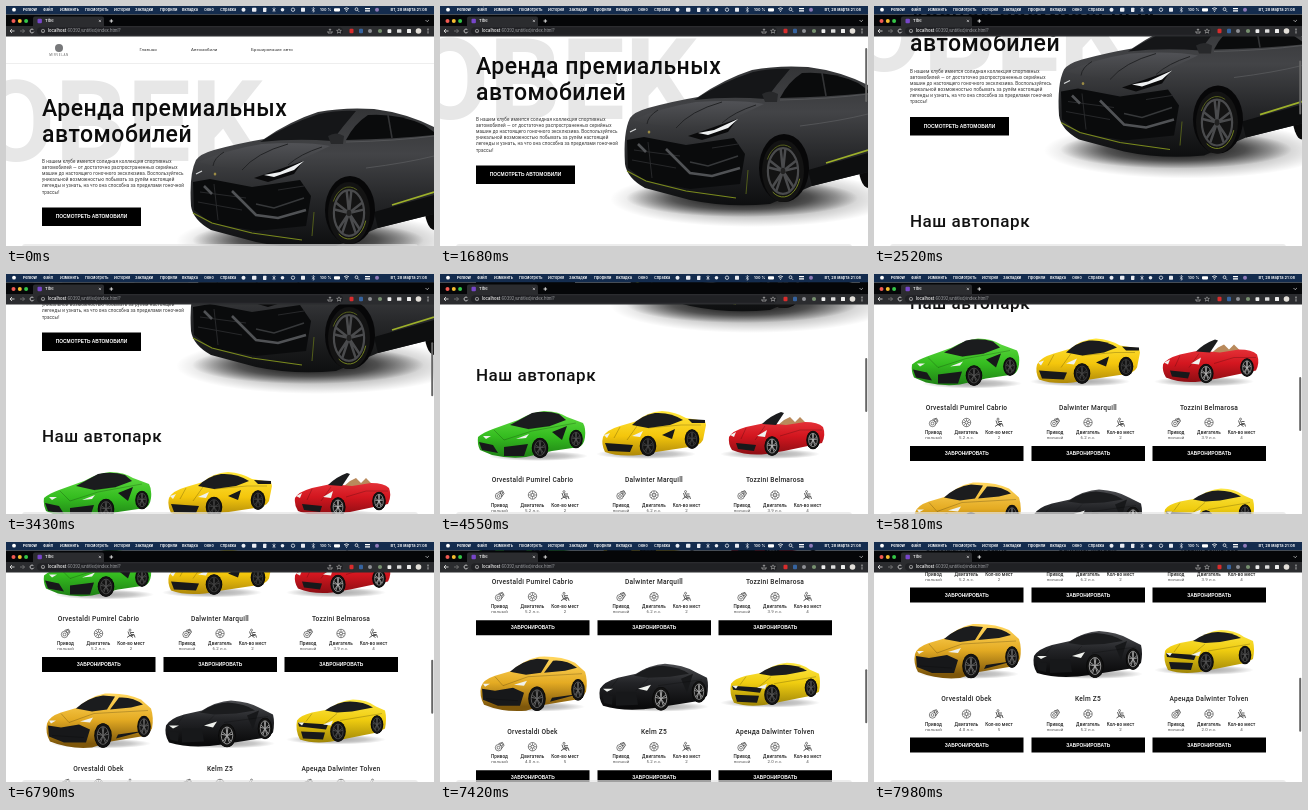
An HTML page with a canvas that plays this animation: 428 px wide and 240 px high, repeating every 8000 ms.

```html
<!DOCTYPE html>
<html lang="ru">
<head>
<meta charset="utf-8">
<title>Аренда автомобилей</title>
<style>
html, body { margin: 0; width: 100%; height: 100%; overflow: hidden; background: #fff; }
canvas { display: block; width: 100vw; height: 100vh; }
</style>
</head>
<body>
<canvas></canvas>
<script>
const W = 428, H = 240, LOOP = 8000, STEP = 70, START = 910;
const canvas = document.querySelector('canvas');
const c = canvas.getContext('2d');
const ROBOTO = 'Roboto, sans-serif', INTER = 'Inter, sans-serif', ARIAL = '"Liberation Sans", sans-serif';

// Page scroll: time in ms, offset in px
const SCROLL = [[START, 0], [1680, 42], [3430, 143], [4550, 204], [5810, 276.5], [6790, 333.5], [7980, 403]];

function scrollAt(t) {
  if (t < START + STEP) return 0;
  const q = START + Math.floor((t - START) / STEP) * STEP;
  for (let i = 1; i < SCROLL.length; i++) {
    const [t0, a] = SCROLL[i - 1], [t1, b] = SCROLL[i];
    if (q <= t1) return a + (b - a) * (q - t0) / (t1 - t0);
  }
  return SCROLL[SCROLL.length - 1][1];
}

function text(s, x, y, size, { font = ROBOTO, weight = 400, color = '#111', align = 'left', gap = 0 } = {}) {
  c.font = `${weight} ${size}px ${font}`;
  c.letterSpacing = gap + 'px';
  c.textAlign = align;
  c.textBaseline = 'alphabetic';
  c.fillStyle = color;
  c.fillText(s, x, y + size * 0.355);
}

function rect(x, y, w, h, color, r = 0) {
  c.fillStyle = color;
  c.beginPath();
  c.roundRect(x, y, w, h, r);
  c.fill();
}

function oval(x, y, rx, ry, color) {
  c.fillStyle = color;
  c.beginPath();
  c.ellipse(x, y, rx, ry, 0, 0, 7);
  c.fill();
}

function ring(x, y, rx, ry, color, width = 0.6, from = 0, to = 7) {
  c.strokeStyle = color;
  c.lineWidth = width;
  c.beginPath();
  c.ellipse(x, y, rx, ry, 0, from, to);
  c.stroke();
}

function shape(d, color) {
  c.fillStyle = color;
  c.fill(new Path2D(d));
}

function line(d, color, width = 0.7) {
  c.strokeStyle = color;
  c.lineWidth = width;
  c.stroke(new Path2D(d));
}

function fade(y0, y1, ...colors) {
  const g = c.createLinearGradient(0, y0, 0, y1);
  colors.forEach((col, i) => g.addColorStop(i / (colors.length - 1), col));
  return g;
}

function shadow(x, y, rx, ry, alpha) {
  c.save();
  c.translate(x, y);
  c.scale(rx, ry);
  const g = c.createRadialGradient(0, 0, 0, 0, 0, 1);
  g.addColorStop(0, `rgba(0,0,0,${alpha})`);
  g.addColorStop(0.6, `rgba(0,0,0,${alpha * 0.6})`);
  g.addColorStop(1, 'rgba(0,0,0,0)');
  oval(0, 0, 1, 1, g);
  c.restore();
}

function wheel(x, y, rx, ry, rim) {
  oval(x, y, rx, ry, '#131313');
  ring(x, y, rx * 0.72, ry * 0.74, rim, ry * 0.07);
  c.strokeStyle = rim;
  c.lineWidth = ry * 0.08;
  c.beginPath();
  for (let i = 0; i < 5; i++) {
    const a = i * Math.PI * 0.4 - 1.57;
    for (const da of [-0.16, 0.16]) {
      c.moveTo(x, y);
      c.lineTo(x + Math.cos(a + da) * rx * 0.7, y + Math.sin(a + da) * ry * 0.72);
    }
  }
  c.stroke();
}

function blackButton(x, y, w, h, label) {
  rect(x, y, w, h, '#000');
  text(label, x + w / 2, y + h / 2, 4.9, { font: ARIAL, weight: 700, color: '#fff', align: 'center' });
}

const CARS = [
  { name: 'Orvestaldi Pumirel Cabrio', power: '5.2', seats: 2, colors: ['#62dc42', '#35bd20', '#1c7a14'], rim: '#555',
    body: 'M38 163Q44 158 53 155L78 146Q92 138 104 137Q118 137 127 143L143 149Q146 154 145 163Q144 171 139 173L112 177L86 183Q70 185 52 181L40 176Q37 170 38 163Z',
    glass: 'M70 151L92 139Q106 136 119 140L126 146L110 152L88 155Z',
    dark: 'M39 168L53 171L58 179L42 176ZM64 173L88 170L84 182L64 182ZM112 158L127 152L122 166Z',
    lamp: 'M43 162L51 162L46 165ZM76 165L89 160L86 164Z',
    crease: 'M54 156L64 166L92 157L136 149M88 155L110 152',
    wheels: [[100, 174, 7.5, 10], [136, 165, 6, 9]] },
  { name: 'Dalwinter Marquill', power: '6.2', seats: 2, colors: ['#ffe53a', '#f4c60c', '#9e7a08'], rim: '#444',
    body: 'M163 163Q166 156 180 152L197 147Q207 138 222 137Q236 138 246 144L265 147L266 151L263 166Q260 172 249 173L216 178L199 181Q178 183 165 178Q161 170 163 163Z',
    glass: 'M192 151Q202 141 215 139Q231 138 243 146L230 151L208 154Z',
    dark: 'M165 169L193 171L190 178L168 177ZM222 161L235 155L232 165ZM248 145L265 146L265 149L252 149Z',
    lamp: 'M164 161L170 159L167 164ZM192 162L203 157L200 163Z',
    crease: 'M180 153L174 164M197 152L187 166M208 154L241 151L261 151',
    wheels: [[208, 172, 7.5, 10], [252, 165, 6.5, 9.5]] },
  { name: 'Tozzini Belmarosa', power: '3.9', seats: 4, colors: ['#f04348', '#d3161f', '#780b10'], rim: '#bbb',
    body: 'M289 163Q292 157 306 153L325 149L346 151L365 148Q378 148 383 153Q386 161 382 169L344 177L326 180Q307 182 292 176Q288 170 289 163Z',
    glass: 'M322 150Q330 142 341 138L344 139L336 151Z',
    trim: 'M338 151L344 146L350 143L355 148L360 143L366 149L350 153Z',
    dark: 'M296 169L316 171L314 177L298 175Z',
    lamp: 'M290 161L296 158L294 163ZM317 162L327 156L325 163Z',
    crease: 'M306 154L301 165M325 152L315 166M340 162L360 156L382 156',
    wheels: [[332, 172, 6.8, 9.5], [373, 166, 6, 9]] },
  { name: 'Orvestaldi Obek', power: '4.0', seats: 5, colors: ['#ffd55c', '#e4ab23', '#7e570b'], rim: '#666',
    body: 'M41 112Q43 105 55 101L72 96Q84 85 99 82Q121 81 135 88L145 97Q148 106 146 117L141 124L105 130L86 136Q64 138 44 130Q39 121 41 112Z',
    glass: 'M70 97Q82 86 97 84L109 85L101 98L86 100ZM104 98L113 86Q127 85 137 93L125 96Z',
    dark: 'M42 114L55 116L73 113L84 118L80 131L58 131L43 125ZM140 119L110 127L112 123Z',
    lamp: 'M43 109L50 109L45 112ZM74 110L87 106L84 111Z',
    crease: 'M55 102L63 111L88 102L142 99M46 124L78 126',
    wheels: [[97, 124, 8, 12], [138, 115, 6, 10.5]] },
  { name: 'Kelm Z5', power: '5.2', seats: 2, colors: ['#56575b', '#232427', '#0a0a0b'], rim: '#a8a8a8',
    body: 'M160 114Q164 107 178 103L196 99Q210 90 225 89Q243 90 255 97L267 103Q269 111 267 121L260 126L216 133Q186 138 163 131Q158 123 160 114Z',
    glass: 'M194 101Q208 91 222 91Q239 92 249 99L230 102L208 103Z',
    dark: 'M162 119L173 121L172 130L164 128ZM176 117L196 117L198 130L176 131ZM241 104L253 99L247 118Z',
    lamp: 'M163 114L173 114L167 117ZM198 114L211 110L207 116Z',
    crease: 'M178 104L170 114M208 104L196 116M218 111L262 105',
    wheels: [[221, 124, 8, 11.5], [259, 117, 6.5, 10.5]] },
  { name: 'Аренда Dalwinter Tolven', power: '2.0', seats: 4, colors: ['#ffec52', '#f0cd10', '#9b8207'], rim: '#555',
    body: 'M291 109Q294 104 306 101L322 98Q334 89 347 88Q361 88 370 95L379 99Q381 107 379 117L371 121L336 128Q311 134 294 128Q289 119 291 109Z',
    glass: 'M319 99Q332 90 344 90Q358 90 367 96L346 100L331 101Z',
    dark: 'M292 111L322 113L320 118L293 115ZM295 120L319 121L317 128L297 127Z',
    lamp: 'M292 111L298 111L296 114ZM317 113L327 109L325 114Z',
    crease: 'M306 102L300 110M331 102L319 112M334 109L376 102',
    wheels: [[332, 120, 7, 10], [371, 113, 5.5, 9]] },
];

function smallCar(car, row) {
  const top = row ? 84 : 138, [x, y] = car.wheels[0];
  shadow(x - 2, y + 8, 50, 5, 0.35);
  for (const [wx, wy, rx, ry] of car.wheels) oval(wx, wy, rx + 1, ry, '#0b0b0b');
  if (car.trim) shape(car.trim, '#b98a5c');
  shape(car.body, fade(top, top + 48, ...car.colors));
  shape(car.glass, '#1b1c1e');
  shape(car.dark, '#17181a');
  line(car.crease, 'rgba(0,0,0,.3)', 0.7);
  shape(car.lamp, '#f0f2ee');
  for (const [wx, wy, rx, ry] of car.wheels) {
    oval(wx, wy, rx + 0.8, ry + 0.2, '#080808');
    wheel(wx, wy, rx, ry, car.rim);
  }
}

function specIcon(kind, x, y) {
  const ink = '#333';
  if (kind === 0) {
    ring(x - 1, y + 1, 3.2, 3.2, ink);
    ring(x - 1, y + 1, 1.4, 1.4, ink);
    line(`M${x - 1} ${y - 3}L${x + 3} ${y - 4.3}L${x + 4.5} ${y - 1.5}L${x + 2} ${y + 2}`, ink);
    ring(x + 2, y - 2, 1.2, 1.2, ink);
  } else if (kind === 1) {
    ring(x, y, 4.2, 4.2, ink);
    ring(x, y, 1.5, 1.5, ink);
    line(`M${x - 4} ${y}h2.5m3 0h2.5M${x} ${y - 4}v2.5m0 3v2.5M${x - 3} ${y - 3}l2 2m2 2l2 2M${x + 3} ${y - 3}l-2 2m-2 2l-2 2`, ink, 0.5);
  } else {
    ring(x - 1, y - 3.4, 1, 1, ink);
    line(`M${x - 1} ${y - 2}l1 3h3l1 3M${x - 3} ${y - 2}l1.4 4h4M${x - 4} ${y + 4}l3-2 3 2M${x} ${y - 1}h3`, ink, 0.8);
  }
}

function card(car, i) {
  const row = Math.floor(i / 3), cx = [92.5, 214, 335][i % 3], dy = row * 150;
  c.save();
  c.translate(0, row ? 403 : 204);
  smallCar(car, row);
  c.restore();
  text(car.name, cx, 410 + dy, 6.6, { weight: 500, align: 'center', gap: 0.25, color: '#222' });
  const specs = [['Привод', 'полный'], ['Двигатель', car.power + ' л.с.'], ['Кол-во мест', car.seats]];
  specs.forEach(([label, value], k) => {
    const x = cx + [-33, 0, 32.5][k];
    specIcon(k, x, 425 + dy);
    text(label, x, 435 + dy, 4.6, { weight: 500, align: 'center', gap: 0.1, color: '#222' });
    text(value, x, 440 + dy, 4.4, { align: 'center', gap: 0.1, color: '#555' });
  });
  blackButton(cx - 56.5, 448.5 + dy, 113.5, 15, 'ЗАБРОНИРОВАТЬ');
}

function heroCar() {
  shadow(312, 235, 142, 28, 0.4);
  shadow(302, 234, 116, 19, 0.95);
  oval(428, 196, 10, 28, '#0a0a0a');
  shape('M185 200Q183 168 190 154Q194 148 208 144Q234 137 258 133Q284 115 312 106Q338 101 368 103Q400 107 428 121L428 208L372 222L330 240Q288 244 250 236L205 224Q187 214 185 200Z',
    fade(102, 240, '#333436', '#434447', '#252628', '#0e0f10'));
  // Windshield, hood and side glass
  shape('M254 136Q282 118 313 108Q334 104 350 105Q337 120 326 135Q290 132 254 136Z', '#151618');
  shape('M192 156Q224 143 256 138Q300 135 324 140Q302 150 282 160Q236 168 192 156Z', fade(138, 165, '#505155', '#38393b'));
  line('M218 146Q208 152 207 160M282 138Q250 147 236 164M316 141Q294 148 282 159', '#232426', 1);
  shape('M340 134Q348 118 362 109Q392 107 418 119L428 126L428 129Q390 133 340 134Z', '#0a0b0c');
  line('M382 109L386 132', '#333436', 1.6);
  line('M340 136Q390 135 428 130M360 162Q400 157 428 150', '#5a5b5e', 0.8);
  shape('M322 130Q330 125 338 130L337 138L325 138Z', '#28292b');
  // Grille and bumper
  shape('M187 176L204 173L246 181L294 174L305 190L300 220L250 225L205 217L188 204Z', '#0a0b0c');
  line('M194 186L240 192M192 196L236 204M208 178L212 214M272 184L298 180', '#2b2c2e', 0.9);
  line('M226 185L250 209L272 212L300 204M198 180L206 188', '#505255', 2.6);
  line('M250 198L268 202L298 192', '#36383a', 1.4);
  shape('M248 172L297 155L288 168L262 176Z', '#0a0a0b');
  shape('M258 169L274 166L298 155L288 164L268 171Z', '#eef0f1');
  line('M190 168L196 165', '#d8dadb', 1.2);
  oval(209, 168, 1.3, 1.5, '#9b8b45');
  line('M187 207L206 217L246 227L296 234', '#7a8a1d', 1.2);
  line('M308 206L306 230', '#59651b', 0.9);
  shape('M368 206L428 189L428 208L372 222Z', '#0d0e0f');
  line('M386 199L428 186', '#9db02a', 1.8);
  oval(344, 204, 25, 34, '#070708');
  wheel(343, 207, 21, 31, '#4a4b4d');
  ring(343, 207, 17.5, 26, '#7d8d22', 0.9, 0.3, 2.2);
  ring(343, 207, 17.5, 26, '#66731f', 0.8, 3.6, 5.2);
  oval(343, 207, 2.3, 3.2, '#222');
}

const ABOUT = [
  'В нашем клубе имеется солидная коллекция спортивных',
  'автомобилей — от достаточно распространенных серийных',
  'машин до настоящего гоночного эксклюзива. Воспользуйтесь',
  'уникальной возможностью побывать за рулём настоящей',
  'легенды и узнать, на что она способна за пределами гоночной',
  'трассы!',
];

function page() {
  oval(53, 42, 4, 4, '#77787a');
  text('MIRVELAN', 53, 49, 3, { align: 'center', gap: 0.6, color: '#666' });
  rect(0, 57, W, 0.6, '#dedede');
  [['Главная', 133.5], ['Автомобили', 185], ['Бронирование авто', 245]].forEach(([s, x]) =>
    text(s, x, 43.6, 4.4, { gap: 0.08, color: '#333' }));
  text('OBEK', -29, 115, 113, { weight: 700, color: '#e7e7e7' });
  heroCar();
  const head = { weight: 500, gap: 0.5, color: '#0c0c0c' };
  text('Аренда премиальных', 36, 101.5, 23, head);
  text('автомобилей', 36, 127.5, 23, head);
  ABOUT.forEach((s, i) => text(s, 36, 155.4 + i * 6.1, 4.6, { gap: 0.1, color: '#333' }));
  blackButton(36, 201.5, 99, 18.5, 'ПОСМОТРЕТЬ АВТОМОБИЛИ');
  text('Наш автопарк', 36, 305, 17, { weight: 500, gap: 0.5 });
  CARS.forEach(card);
}

const MENU = [['Файл', 37], ['Изменить', 54], ['Посмотреть', 79], ['История', 108], ['Закладки', 129],
  ['Профили', 154], ['Вкладка', 176], ['Окно', 198], ['Справка', 214]];

function menuBar() {
  rect(0, 0, W, 8.5, '#142c4e');
  const ink = { font: INTER, weight: 600, color: '#fff' };
  oval(8, 3.7, 1.9, 1.9, '#fff');
  text('Fenlow', 17, 3.8, 4, { ...ink, weight: 700 });
  MENU.forEach(([s, x]) => text(s, x, 3.8, 3.8, ink));
  oval(237.5, 3.7, 2, 2, '#e8ebf2');
  rect(246, 1.8, 4.4, 4, '#e8ebf2', 0.8);
  rect(257, 1.7, 3.4, 4.2, '#e8ebf2', 0.6);
  line('M268 1.5v4.6M266.5 2.5l3 2.6M269.5 2.5l-3 2.6', '#e8ebf2');
  oval(276.5, 3.7, 1.8, 1.8, '#e8ebf2');
  ring(287, 3.7, 1.7, 1.7, '#e8ebf2', 0.8);
  rect(295, 1.7, 4, 4, '#e8ebf2', 0.6);
  line('M306 2.4l2.6 2.6-1.3 1.3v-5l1.3 1.3-2.6 2.6', '#e8ebf2', 0.6);
  text('100 %', 314, 3.8, 3.8, ink);
  rect(328, 2.2, 6, 3.2, '#fff', 0.8);
  line('M338 2.8q2.5-2 5 0M339 4.1q1.5-1 3 0M340 5.3h1', '#fff', 0.8);
  ring(350.5, 3.2, 1.4, 1.4, '#fff', 0.7);
  line('M351.6 4.3l1.5 1.5', '#fff');
  line('M359 2.6h5M359 4.9h5', '#fff', 1.1);
  oval(371, 3.7, 2, 2, '#8d7ab8');
  text('Вт, 28 марта 21:08', 384.5, 3.8, 4, ink);
}

function browser() {
  rect(0, 8.5, W, 12, '#050608');
  ['#f25a52', '#f5bd2f', '#35c648'].forEach((col, i) => oval(7.5 + i * 6.3, 15, 2, 2, col));
  rect(27, 10.5, 71, 11, '#2b2c2f', 2);
  rect(31.5, 12.8, 4.4, 4.4, '#7746c9', 1);
  const ink = { font: INTER, weight: 500, color: '#fff' };
  text('Title', 39, 15, 4.1, ink);
  line('M92.8 13.8l2.2 2.2m0-2.2l-2.2 2.2', '#ddd', 0.6);
  line('M103.5 15h3.6M105.3 13.2v3.6', '#fff', 0.8);
  line('M419.5 14l1.7 1.7 1.7-1.7', '#ddd', 0.7);

  rect(0, 20, W, 10.5, '#2b2c2f');
  rect(31, 21.2, 306, 7.6, '#202124', 3.8);
  line('M8.5 25h-4.5m2-2l-2 2 2 2', '#eee', 0.8);
  line('M14 25h4.5m-2-2l2 2-2 2', '#888');
  ring(26, 25, 1.9, 1.9, '#eee', 0.8, 0.4, 5.6);
  ring(37, 25, 1.7, 1.7, '#ccc', 0.6);
  line('M37 24.8v1.2', '#ccc', 0.6);
  text('localhost', 42, 25, 4.2, ink);
  const x = 42 + c.measureText('localhost').width;
  text(':60392/untitled/index.html?', x, 25, 4.2, { ...ink, weight: 400, color: '#a5a7ab' });
  line('M324 23v3M322.8 24l1.2-1.2 1.2 1.2M322 25v2h4v-2', '#ccc', 0.6);
  line('M333 22.8l.7 1.5 1.7.1-1.3 1.1.5 1.7-1.6-1-1.6 1 .5-1.7-1.3-1.1 1.7-.1Z', '#ccc', 0.5);
  rect(343.5, 22.8, 4, 4.4, '#d92c2c', 1);
  rect(353, 22.8, 4, 4.4, '#35639f', 1);
  oval(364, 25, 2, 2, '#8f9195');
  oval(374, 25, 2.1, 2.1, '#77906f');
  rect(381.5, 23.2, 3.8, 3.8, '#eee', 0.7);
  rect(391, 23.2, 4.4, 3.6, '#ddd', 0.6);
  rect(401, 23, 4, 4, '#eee', 0.6);
  oval(412.5, 25, 2.8, 2.8, '#e4e0da');
  [23.2, 25, 26.8].forEach(y => oval(422, y, 0.6, 0.6, '#eee'));
}

function draw(t) {
  const s = scrollAt(t);
  rect(0, 0, W, H, '#fff');
  c.save();
  c.translate(0, -s);
  page();
  c.restore();
  if (s > 0) rect(425.2, 31 + s * 0.26, 2, 54, '#666', 1);
  rect(16, 238, 396, 6, 'rgba(228,228,228,.7)', 3);
  menuBar();
  browser();
}

function resize() {
  const d = window.devicePixelRatio || 1;
  canvas.width = Math.round(innerWidth * d);
  canvas.height = Math.round(innerHeight * d);
}

const begin = performance.now();
function tick() {
  c.setTransform(canvas.width / W, 0, 0, canvas.height / H, 0, 0);
  draw((performance.now() - begin) % LOOP);
  requestAnimationFrame(tick);
}
addEventListener('resize', resize);
resize();
tick();
</script>
</body>
</html>
```
